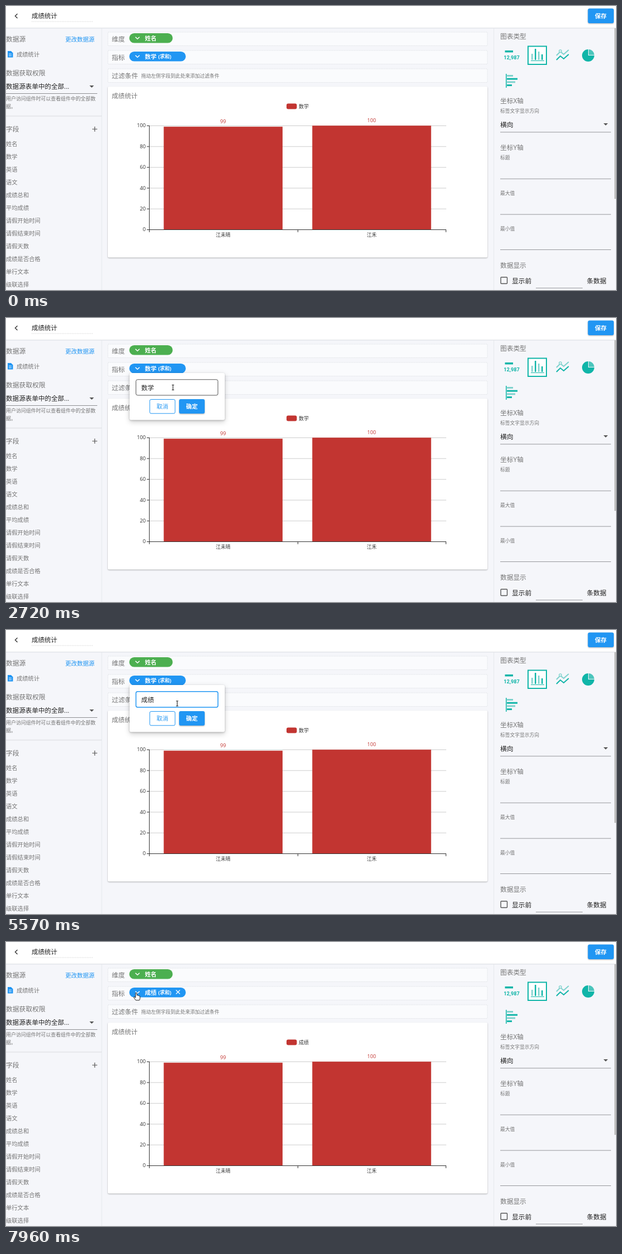
Recreate the animation shown at these times as an HTML page. Size 1096 by 511 pixels, loop 8000 ms.

```html
<!DOCTYPE html>
<html lang="zh-CN">
<head>
<meta charset="utf-8">
<style>
html, body { margin: 0; width: 100%; height: 100%; overflow: hidden; background: #f5f6fa; }
svg { display: block; width: 100%; height: 100%; font-family: "Open Sans", "Noto Sans CJK SC", "Noto Sans CJK", sans-serif; }
text { white-space: pre; }
.lift { filter: drop-shadow(0 1px 1.2px rgba(0,0,0,.3)); }
.float { filter: drop-shadow(0 1.5px 1.5px rgba(0,0,0,.22)) drop-shadow(0 3px 5px rgba(0,0,0,.2)); }
</style>
</head>
<body>
<svg viewBox="0 0 1096 511"><g id="page"></g><g id="live"></g></svg>
<script>
const BLUE = '#2196f3', RED = '#c23531', TEAL = '#10b5a8', PALE = '#7fd2cd';
const GREY = '#757575', DARK = '#212121', LOOP = 8000;

// Shape helpers; text and lines are placed by their vertical centre.
const rect = (x, y, w, h, fill, extra = '') =>
  `<rect x="${x}" y="${y}" width="${w}" height="${h}" fill="${fill}" ${extra}/>`;
const path = (d, stroke, w = 1, fill = 'none', extra = '') =>
  `<path d="${d}" stroke="${stroke}" stroke-width="${w}" fill="${fill}" ${extra}/>`;
const text = (s, x, y, size, fill = GREY, weight = 400, anchor = 'start', extra = '') =>
  `<text x="${x}" y="${y + size * .37}" font-size="${size}" fill="${fill}" font-weight="${weight}" text-anchor="${anchor}" ${extra}>${s}</text>`;
const hline = (x1, x2, y, color) => rect(x1, y - .5, x2 - x1, 1, color);
const triangle = (x, y) => path(`M${x - 4} ${y - 2}h8l-4 4z`, 'none', 0, '#555');
const group = (body, attrs) => `<g ${attrs}>${body}</g>`;

function header() {
  return rect(0, 0, 1096, 39, '#fff') + hline(0, 1096, 39.5, '#e1e3e7') + hline(0, 1096, 40.5, '#eef0f4') +
    path('M20.500 14L16.500 18L20.500 22', '#333', 1.4) +
    text('成绩统计', 46, 18, 11.5, DARK) +
    path('M46 28H156', '#ddd', 1, 'none', 'stroke-dasharray="2 1"') +
    rect(1045.5, 4.5, 46.5, 26.5, BLUE, 'rx="3" class="lift"') +
    text('保存', 1068.5, 18, 10.6, '#fff', 700, 'middle');
}

function leftPanel() {
  const fields = ['姓名', '数学', '英语', '语文', '成绩总和', '平均成绩', '请假开始时间',
    '请假结束时间', '请假天数', '成绩是否合格', '单行文本', '级联选择'];
  return rect(171.5, 40, 1, 471, '#e6e8ec') +
    text('数据源', 0, 60, 11.8) + text('更改数据源', 106.5, 60, 10.5, BLUE) +
    path('M3 81h6l3.500 3.500V92.500H3z', 'none', 0, BLUE) +
    path('M5 86.500h5M5 89.500h5', '#fff') +
    text('成绩统计', 19, 87, 10.3) +
    text('数据获取权限', 0, 120.5, 11.8) +
    text('数据源表单中的全部...', 0, 145, 11.6, DARK) + triangle(154, 145) +
    hline(0, 164, 157.5, '#8d8e91') +
    text('用户访问组件时可以查看组件中的全部数', 0, 166.5, 8.95) + text('据。', 0, 180.5, 8.95) +
    hline(0, 172, 198, '#d9dbdf') +
    text('字段', 0, 222, 11.8) + path('M155 221.500h9M159.500 217v9', '#555', 1.2) +
    fields.map((f, i) => text(f, 0, 248 + i * 23, 10.3)).join('');
}

function rows() {
  return ['维度', '指标', '过滤条件'].map((name, i) => {
    const y = 47.5 + i * 33;
    return rect(183, y - .5, 682, 24.5, '#fafbfd', 'stroke="#e3e5e9" stroke-dasharray="2 1" rx="1"') +
      text(name, 190, y + 12.5, 11.8);
  }).join('') + text('拖动左侧字段到此处来添加过滤条件', 243, 125.5, 8.77) +
    rect(221.5, 49, 78, 17.5, '#4caf50', 'rx="8.75"') + chevron(57.5) +
    text('姓名', 249.5, 58, 10.5, '#fff', 700);
}

function chartFrame() {
  let s = rect(183, 145, 682, 307.5, '#fff', 'rx="2" class="lift"') + text('成绩统计', 190, 162, 11.6);
  for (let v = 0; v <= 100; v += 20) {
    const y = 402.5 - v * 1.87;
    s += hline(257, 791, y, '#ccc') + hline(253, 257, y, '#333') +
      text(v, 251, y - .5, 9.2, '#333', 400, 'end');
  }
  return s + rect(504, 175.5, 18.5, 10, RED, 'rx="3"');
}

function icons() {
  const bars = [[944, 86], [950, 77], [956, 82], [962, 87]];
  const lengths = [13, 21, 17, 11];
  return rect(896.5, 80, 14.5, 3.5, TEAL) +
    text('12,987', 908.5, 92.5, 9.2, TEAL, 700, 'middle', 'font-family="Roboto, sans-serif"') +
    rect(938, 72.5, 33, 32.5, '#fff', `stroke="${TEAL}" stroke-width="2"`) +
    bars.map(([x, y], i) => rect(x, y, 2.5, 97 - y, i % 2 ? TEAL : PALE)).join('') +
    hline(943, 967, 98.5, TEAL) +
    path('M989 89L996 82L1002 87L1011 79', PALE, 2) +
    `<circle cx="996" cy="81" r="2.2" fill="#f5f6fa" stroke="${PALE}" stroke-width="1.3"/>` +
    path('M989 97L996 90L1002 95L1011 87', TEAL, 2) +
    path('M1046 89V78A11 11 0 1 0 1057 89Z', 'none', 0, TEAL) +
    path('M1047 88V78A10.500 10.500 0 0 1 1057 88Z', 'none', 0, '#4cc5bc') +
    rect(898, 122, 1.5, 25, TEAL) +
    lengths.map((w, i) => rect(900, 124 + i * 5.7, w - 2, 3, i % 2 ? TEAL : PALE)).join('');
}

function rightPanel() {
  const labels = [['图表类型', 55], ['坐标X轴', 171], ['坐标Y轴', 255], ['数据显示', 467]];
  const hints = [['标签文字显示方向', 188.5], ['标题', 272.5], ['最大值', 336.5], ['最小值', 400.5]];
  return rect(876, 40, 1, 471, '#e6e8ec') + icons() +
    labels.map(([s, y]) => text(s, 888, y, 11.7)).join('') +
    hints.map(([s, y]) => text(s, 888, y, 8.75)).join('') +
    text('横向', 888, 214, 11.7, DARK) + triangle(1077.5, 213) +
    [227, 311, 375, 438.5].map(y => hline(888, 1087, y, '#96979b')).join('') +
    rect(889, 488, 11.5, 11.5, 'none', 'stroke="#555" stroke-width="1.4" rx="1"') +
    text('显示前', 909, 494.5, 11.7, DARK) + hline(952, 1036, 507.5, '#96979b') +
    text('条数据', 1043.5, 494.5, 11.7, DARK) +
    rect(1093, 40, 3, 307, '#c1c1c1');
}

function chevron(y) {
  return path(`M232.500 ${y - 1.7}l3.700 3.500l3.700 -3.500`, '#fff', 1.5);
}

function bars(t) {
  const p = t < 6636 ? 1 : Math.min(1, (t - 6636) / 610);
  const grow = 1 - (1 - p) ** 3;
  return [['江未晴', 99, 283.4], ['江禾', 100, 550.3]].map(([name, v, x]) => {
    const h = v * 1.87 * grow, mid = x + 106.7;
    return rect(x, 402.3 - h, 213.5, h, RED) + text(v, mid, 393 - h, 9.2, RED, 400, 'middle') +
      text(name, mid, 411.5, 8.8, '#333', 400, 'middle');
  }).join('') + hline(257, 791, 402.5, '#333') + rect(257, 215, 1, 187, '#333') +
    [257, 524, 790].map(x => rect(x, 402, 1, 5, '#333')).join('') +
    text(t < 6636 ? '数学' : '成绩', 526, 180.5, 9, '#333');
}

function measure(t, hover) {
  return rect(221.5, 82, 101.5, 17.5, BLUE, 'rx="8.75"') + chevron(90.5) +
    text(t < 6150 ? '数学' : '成绩', 249.5, 91, 10.5, '#fff', 700) +
    text('(求和)', 273.5, 91, 8.8, '#fff', 700) +
    (hover ? path('M305.500 86.500l7 7m0 -7l-7 7', '#fff', 1.3) : '');
}

const fade = (t, start, end, len = 200) =>
  Math.max(0, Math.min(1, (t - start) / len, (end + len - t) / len));

function menu(t) {
  const a = fade(t, 1160, 2030);
  return a ? group(rect(222, 99, 130, 100, '#fff', 'rx="3"') +
    text('修改名称', 237, 126, 11.6, DARK) + text('汇总方式', 237, 171, 11.6, DARK),
    `opacity="${a}" class="float"`) : '';
}

// Input text over time: [start, text, candidates]
const twoWords = '成绩 成绩单 城际 成绩表 乘机 承继 城建';
const typing = [
  [0, '数学'], [3520, '数'], [3660, ''],
  [3830, 'c', '从 才 此 次 出 成 车'], [4140, 'ch', '出 吃 场 长 车 成 处'],
  [4220, 'che', '车 车子 彻底 扯 撤 车辆 澈'], [4300, 'chen', '陈 沉 晨 趁 尘 称 衬'],
  [4380, 'cheng', '成 称 城 程 × 呈 承'],
  [4530, 'chengj', twoWords], [4610, 'chengji', twoWords],
  [4700, '成绩']
];
const INPUT = 11.4;
const EM = { c: .476, h: .613, e: .561, n: .613, g: .548, j: .253, i: .253 };

function imeBar(list) {
  const items = list.split(' '), width = s => 30 + 14 * s.length;
  const split = 242 + items.reduce((sum, s) => sum + width(s), 0);
  let x = 242, s = rect(242.5, 131, split - 242 + 81, 31.5, '#f3f3f4', 'stroke="#d9d9dc"') +
    rect(243, 131.5, 105, 30.5, 'url(#tint)');
  items.forEach((word, i) => {
    if (!i) s += rect(243, 131.5, width(word), 30.5, '#c8b5fb');
    s += text(i + 1, x + 9, 147, 14, '#444') + text(word, x + 23, 147, 14, '#111');
    x += width(word);
  });
  return s + rect(split, 132, 1, 30, '#d9d9dc') + rect(split + 46, 132, 1, 30, '#d9d9dc') +
    path(`M${split + 12} 143l-4 4l4 4`, '#aaa', 1.1) + path(`M${split + 34} 143l4 4l-4 4`, '#333', 1.2) +
    `<circle cx="${split + 64}" cy="147" r="5.500" fill="none" stroke="#333" stroke-width="1.1"/>` +
    path(`M${split + 61} 148.500q3 3.500 6 0M${split + 62} 144.500v1.500M${split + 66} 144.500v1.500`, '#333', 1.1);
}

function dialog(t) {
  const a = fade(t, 2100, 6020);
  if (!a) return '';
  const focus = t >= 2890, [, word, list] = typing.findLast(k => t >= k[0]);
  const end = 243 + INPUT * [...word].reduce((w, c) => w + (EM[c] || 1), 0);
  const caret = focus && (t < 3350 || (t > 3520 && t < 5250) || t > 5780);
  return group(rect(222, 99, 171, 84.5, '#fff', 'rx="3" class="float"') +
    rect(233.5, 110.8, 147.3, 28.2, '#fff', `rx="3" stroke="${focus ? BLUE : '#555'}" stroke-width="${focus ? 1.5 : 1}"`) +
    text(word, 243, 125.5, INPUT, DARK) +
    (caret ? rect(Math.round(end) - .5, 117, 1, 16, list ? BLUE : '#222') : '') +
    rect(258.3, 146.5, 45.5, 25.3, '#fff', `rx="2.5" stroke="${BLUE}"`) +
    text('取消', 281, 159.5, 10.5, BLUE, 400, 'middle') +
    rect(311, 146, 46, 26, BLUE, 'rx="3" class="lift"') +
    text('确定', 334, 159.5, 10.5, '#fff', 700, 'middle') +
    (list ? imeBar(list) : ''), `opacity="${a}"`);
}

// Pointer path: [time, x, y, shape from here on]
const route = [
  [130, 795, 384, 'arrow'], [490, 242, 86, 'hand'], [530, 240, 83, 'hand'], [600, 241, 83, 'hand'],
  [770, 238, 83, 'hand'], [850, 232, 78, 'arrow'], [930, 229, 80, 'arrow'], [1010, 235, 85, 'hand'],
  [1160, 235, 87, 'hand'], [1790, 275, 120, 'hand'], [2030, 275, 120, 'hand'],
  [2150, 281, 122, 'beam'], [2720, 300, 125, 'beam'], [5470, 300, 125, 'beam'],
  [5740, 324, 148, 'hand'], [5880, 333, 161, 'hand'], [6650, 333, 161, 'arrow'],
  [6880, 327, 158, 'arrow'], [7560, 237, 97, 'hand'], [7640, 235, 99, 'hand'],
  [7740, 236, 101, 'hand'], [7960, 234, 91, 'hand'], [LOOP, 234, 91, 'hand']
];
const shapes = {
  arrow: path('M0 0V10.500L2.500 8.200L4.200 12L5.800 11.300L4.200 7.600H7.500Z', '#222', .9, '#fff'),
  hand: path('M-1.200 1Q0 -.8 1.200 1V5Q2.500 4.200 3.300 5.500Q4.600 4.800 5.200 6.200Q6.600 5.800 6.800 7.300V10.500Q6.500 12 5.700 13.800H-.8L-4.300 9Q-4.700 7.200 -3 7.700L-1.200 9.300Z', '#222', 1, '#fff'),
  beam: path('M-2 -4.500H-.5L0 -4L.5 -4.500H2M0 -4V4M-2 4.500H-.5L0 4L.5 4.500H2', '#222', 1.1)
};

function pointer(t) {
  const i = route.findLastIndex(k => t >= k[0]);
  if (i < 0) return null;
  const a = route[i], b = route[i + 1] || a;
  const p = (t - a[0]) / (b[0] - a[0] || 1), e = p * p * (3 - 2 * p);
  return { x: a[1] + (b[1] - a[1]) * e, y: a[2] + (b[2] - a[2]) * e, shape: a[3] };
}

page.innerHTML = '<defs><linearGradient id="tint"><stop offset=".4" stop-color="#e3eaf6"/><stop offset="1" stop-color="#f3f3f4"/></linearGradient></defs>' +
  rect(0, 0, 1096, 511, '#f5f6fa') + header() + leftPanel() + rows() + chartFrame() + rightPanel();

const began = performance.now();
function draw() {
  const t = (performance.now() - began) % LOOP, c = pointer(t);
  const hover = c && c.shape === 'hand' && c.x < 323 && c.y >= 82 && c.y <= 101;
  live.innerHTML = bars(t) + measure(t, hover) + menu(t) + dialog(t) +
    (c ? group(shapes[c.shape], `transform="translate(${c.x} ${c.y})"`) : '');
  requestAnimationFrame(draw);
}
draw();
</script>
</body>
</html>
```
